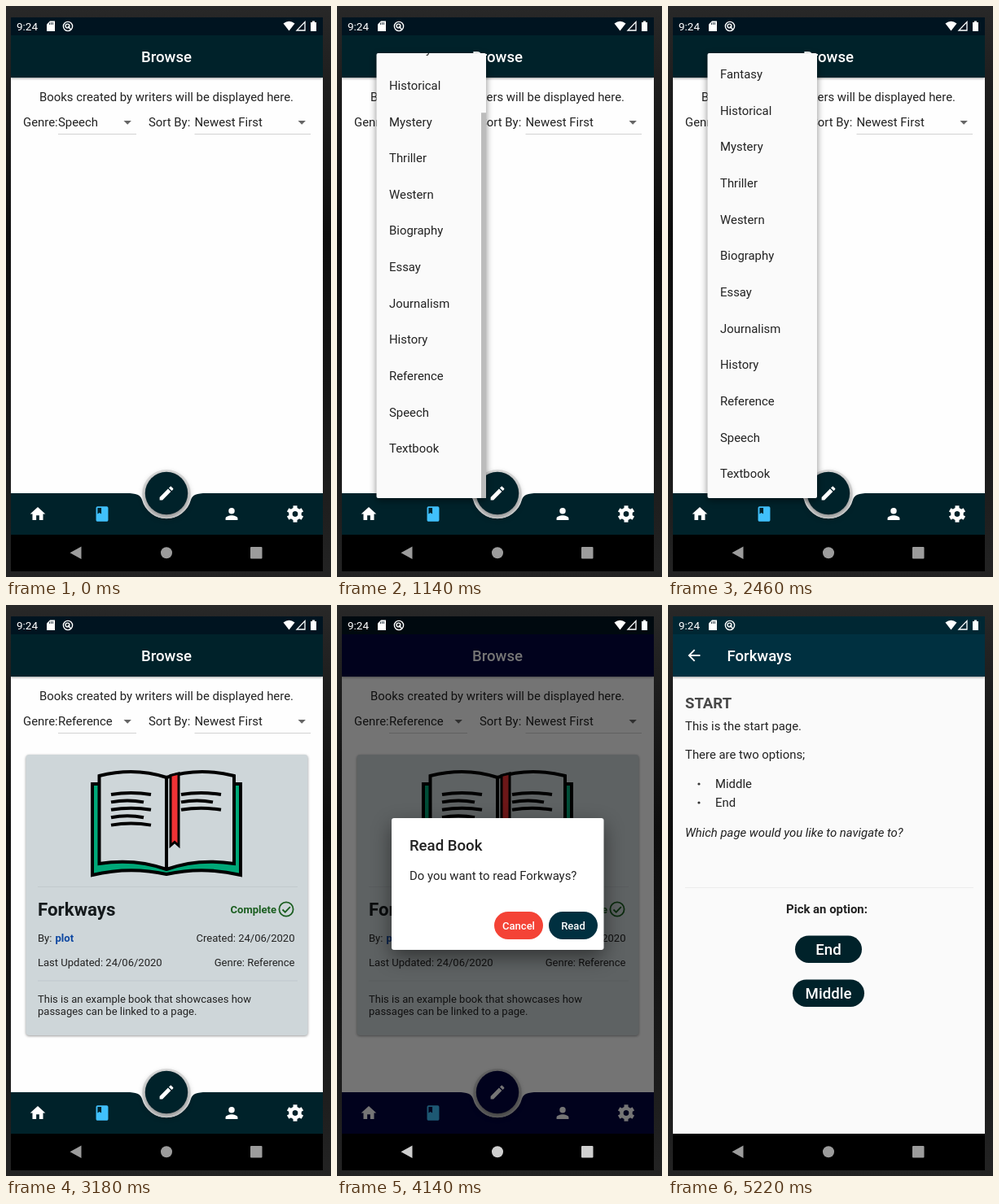
Write an HTML page that moves like this. It is 399 px wide and 702 px high and loops after 7920 ms.

```html
<!DOCTYPE html>
<html lang="en">
<head>
<meta charset="utf-8">
<title>Book browser</title>
<style>
  html, body { margin: 0; width: 100%; height: 100%; overflow: hidden; background: #151515; }
  svg { display: block; width: 399px; height: 702px; font-family: Roboto, sans-serif; --bar: #00222a; }
  text { white-space: pre; }
  .bar { fill: var(--bar); }
  .low { filter: drop-shadow(0 1px 1.5px #0006); }
  .mid { filter: drop-shadow(0 3px 4px #0007); }
  .high { filter: drop-shadow(0 9px 12px #0007); }
</style>
</head>
<body>
<svg id="stage" viewBox="0 0 399 702"></svg>
<script>
const LOOP = 7920, STEP = 60;
const MENU = { x: 48.5, y: 58, w: 134.5, h: 547, row: 44.65, content: 596 };
const GENRES = ['Fantasy', 'Historical', 'Mystery', 'Thriller', 'Western', 'Biography',
  'Essay', 'Journalism', 'History', 'Reference', 'Speech', 'Textbook'];
const TITLE = 'Forkways';
const BODY = 14.9, SMALL = 13.03, HEAD = 18.6;
const INK = '#222';

const text = (x, y, s, size = BODY, fill = INK, more = '') =>
  `<text x="${x}" y="${y}" font-size="${size}" fill="${fill}" ${more}>${s}</text>`;
const rect = (x, y, w, h, fill, more = '') =>
  `<rect x="${x}" y="${y}" width="${w}" height="${h}" fill="${fill}" ${more}/>`;
const path = (d, fill, more = '') => `<path d="${d}" fill="${fill}" ${more}/>`;
const icon = (cx, cy, d, fill = '#fff', scale = .931) =>
  path(d, fill, `fill-rule="evenodd" transform="translate(${cx} ${cy}) scale(${scale}) translate(-12 -12)"`);
const pill = (cx, y, w, h, label, size, fill, base) =>
  rect(cx - w / 2, y, w, h, fill, `rx="${h / 2}"`) +
  text(cx, base, label, size, '#fff', `${MIDDLE} ${MEDIUM}`);
const MIDDLE = 'text-anchor="middle"', END = 'text-anchor="end"';
const MEDIUM = 'font-weight="500"', BOLD = 'font-weight="700"';

const ICONS = {
  home: 'M10 20v-6h4v6h5v-8h3L12 3 2 12h3v8z',
  book: 'M18 2H6c-1.1 0-2 .9-2 2v16c0 1.1.9 2 2 2h12c1.1 0 2-.9 2-2V4c0-1.1-.9-2-2-2zM6 4h5v8l-2.5-1.5L6 12z',
  person: 'M12 12a4 4 0 1 0 0-8 4 4 0 0 0 0 8zm0 2c-2.67 0-8 1.34-8 4v2h16v-2c0-2.66-5.33-4-8-4z',
  edit: 'M3 17.25V21h3.75L17.81 9.94l-3.75-3.75zM20.71 7.04c.39-.39.39-1.02 0-1.41l-2.34-2.34c-.39-.39-1.02-.39-1.41 0l-1.83 1.83 3.75 3.75z',
  back: 'M20 11H7.83l5.59-5.59L12 4l-8 8 8 8 1.41-1.41L7.83 13H20z'
};

function gear(cx, cy) {
  const teeth = [0, 60, 120].map(a => `<path d="M0-10.2V10.2" transform="rotate(${a})"/>`).join('');
  return `<g transform="translate(${cx} ${cy})" fill="none" stroke="#fff">
    <g stroke-width="5">${teeth}</g>
    <circle r="3.2" fill="var(--bar)" stroke="none"/><circle r="5.6" stroke-width="4.4"/>
    <circle r="3.3" class="bar" stroke="none"/></g>`;
}

function dropdown(x, w, id, label) {
  return `<text id="${id}" x="${x}" y="148" font-size="${BODY}" fill="${INK}">${label}</text>` +
    rect(x, 157, w, 1, '#d2d2d2') + path(`M${x + w - 15.5} 141h9.4l-4.7 4.8z`, '#666');
}

function bookArt() {
  const line = (x, y, w) => `M${x} ${y}q${w / 2}-4 ${w} 0`;
  const rows = [0, 1, 2, 3, 4].map(i => line(129, 233 + i * 9.4, i % 2 ? 40 : 49)).join('') +
    [0, 1, 2].map(i => line(215, 233 + i * 9.4, i % 2 ? 39 : 49)).join('');
  return `<g stroke="#000" stroke-width="4">
    ${path('M106 220V332Q152 321 197 331Q242 321 288 332V220Z', '#00a878')}
    ${path('M114.500 210Q158 199 197 212Q236 199 280 210V318Q236 311 197 325Q158 311 114.500 318Z', '#ced6d9')}
    ${path('M197 212V325', 'none')}
    ${path('M202 209.500L212 207V296L207 291.500L202 296Z', '#ef3235', 'stroke-width="3"')}
    ${path(rows, 'none')}</g>`;
}

function card() {
  const rule = y => rect(39, y, 319, 1, '#c2cacd');
  return `<g id="card">${rect(24.5, 184, 346, 345, '#ced6d9', 'rx="4" class="low"')}
    ${bookArt()}${rule(346)}${rule(461.5)}
    ${text(39, 382, TITLE, 22.3, '#151a1c', BOLD)}
    ${text(332, 378.5, 'Complete', SMALL, '#1b5e20', BOLD + END)}
    <g fill="none" stroke="#1b5e20" stroke-width="1.8"><circle cx="344" cy="374" r="8.6"/><path d="M339.500 374.500l3.200 3.200 6.200-6.600"/></g>
    ${text(39, 414, 'By: ', SMALL)}${text(60.5, 414, 'plot', SMALL, '#0d47a1', BOLD)}
    ${text(354.5, 414, 'Created: 24/06/2020', SMALL, INK, END)}
    ${text(39, 444, 'Last Updated: 24/06/2020', SMALL)}
    ${text(354.5, 444, 'Genre: Reference', SMALL, INK, END)}
    ${text(39, 488.5, 'This is an example book that showcases how', SMALL)}
    ${text(39, 503.5, 'passages can be linked to a page.', SMALL)}</g>`;
}

function browse() {
  return rect(6, 14, 383, 636, '#fefefe') +
    rect(6, 36, 383, 52, 'var(--bar)', 'class="low"') + rect(6, 14, 383, 22, '#001420') +
    text(197, 69, 'Browse', HEAD, '#fff', MIDDLE + MEDIUM) +
    text(197, 117, 'Books created by writers will be displayed here.', BODY, INK, MIDDLE) +
    text(21, 148, 'Genre:') + dropdown(64, 96, 'genre', 'Speech') +
    text(175, 148, 'Sort By:') + dropdown(231.5, 142.5, 'sort', 'Newest First') + card() +
    path('M6 599H148C160 599 165 601 167 607A31 31 0 0 0 227 607C229 601 234 599 246 599H389V650H6Z', 'var(--bar)') +
    '<circle cx="197" cy="600" r="30" fill="#e4e4e4"/><circle cx="197" cy="599" r="26.200" class="bar mid"/>' +
    icon(197, 599, ICONS.edit) + icon(39, 624.5, ICONS.home) + icon(118, 624.5, ICONS.book, '#40c0fb') +
    icon(277, 624.5, ICONS.person) + gear(355, 624.5);
}

function menu() {
  const rows = GENRES.map((g, i) => `<text class="row" x="64" y="${89 + i * MENU.row}">${g}</text>`).join('');
  return `<g id="menu">
    <rect id="sheet" x="${MENU.x}" width="${MENU.w}" rx="2" fill="#fafafa" class="mid"/>
    <g clip-path="url(#menuClip)"><g id="rows" font-size="${BODY}" fill="${INK}">${rows}</g></g>
    <rect id="thumb" x="177" width="6" fill="#bcbcbc"/></g>`;
}

function dialog() {
  return `<rect id="dim" x="6" y="14" width="383" height="636"/>
    <g id="dialog">${rect(67, 262, 260.5, 162, '#fff', 'rx="3" class="high"')}
    ${text(89, 302, 'Read Book', HEAD, INK, MEDIUM)}
    ${text(89, 338, `Do you want to read ${TITLE}?`)}
    ${pill(223, 377, 60, 34, 'Cancel', SMALL, '#f44336', 399)}
    ${pill(290, 377, 60, 34, 'Read', SMALL, '#003040', 399)}
    <circle id="splash" cx="290" cy="394" fill="#fff" clip-path="url(#readClip)"/></g>`;
}

function reader() {
  const bullet = (y, s) => `<circle cx="38" cy="${y - 5}" r="1.600" fill="#333"/>` + text(58, y, s);
  return `<g id="page">${rect(6, 14, 383, 636, '#fafafa')}
    ${rect(6, 14, 383, 74, '#003040', 'class="low"')}${rect(6, 14, 383, 22, '#002733')}
    ${icon(32, 62, ICONS.back)}${text(72.5, 69, TITLE, HEAD, '#fff', MEDIUM)}
    ${text(21, 127, 'START', HEAD, '#484848', BOLD)}
    ${text(21, 154, 'This is the start page.')}${text(21, 189, 'There are two options;')}
    ${bullet(225, 'Middle')}${bullet(248, 'End')}
    ${text(21, 284.5, 'Which page would you like to navigate to?', BODY, INK, 'font-style="italic"')}
    ${rect(21, 347, 354, 1, '#ececec')}
    ${text(195, 378.5, 'Pick an option:', BODY, INK, MIDDLE + BOLD)}
    ${pill(197, 406.5, 82, 33.5, 'End', HEAD, '#00222a', 430)}
    ${pill(197, 460.5, 88, 33.5, 'Middle', HEAD, '#00222a', 484)}</g>`;
}

function system() {
  return text(13, 30, '9:24', 13.5, '#fff') +
    path('M54 18.500h6v12.500h-10v-8.500z', '#fff') +
    path('M53.500 20.500v2.500M55.500 20v3M57.500 20v3', 'none', 'stroke="#001420" stroke-width=".8"') +
    '<g fill="none" stroke="#fff" stroke-width="1.400"><circle cx="76" cy="25" r="5.600"/><circle cx="75.500" cy="24.500" r="2.400"/><path d="M76 25l3.800 4"/></g>' +
    path('M340.500 21.500Q347.500 16 354.500 21.500L347.500 30.500Z', '#fff') +
    path('M367 19.500V30H357Z', 'none', 'stroke="#fff" stroke-width="1.300"') +
    path('M374 20h2v-1.500h3V20h2v11h-7z', '#fff') +
    rect(6, 650, 383, 45, '#000') +
    `<g id="keys">${path('M92.500 664.500v15.500L78.500 672.200z', 'inherit')}
      <circle cx="197" cy="672.300" r="7"/><rect x="300" y="665" width="14.500" height="14.500" rx="1"/></g>`;
}

const stage = document.getElementById('stage');
stage.innerHTML = `<defs>
    <linearGradient id="desk" x2="0" y2="1">
      <stop stop-color="#282828"/><stop offset=".15" stop-color="#1d1d1d"/><stop offset=".4" stop-color="#0d0d0d"/>
      <stop offset=".65" stop-color="#151515"/><stop offset="1" stop-color="#232323"/></linearGradient>
    <clipPath id="app">${rect(6, 14, 383, 636, '#000')}</clipPath>
    <clipPath id="menuClip">${rect(MENU.x, MENU.y, MENU.w, MENU.h, '#000')}</clipPath>
    <clipPath id="readClip">${rect(260, 377, 60, 34, '#000', 'rx="17"')}</clipPath>
  </defs>
  ${rect(0, 0, 399, 702, 'url(#desk)')}
  <g clip-path="url(#app)">${browse()}${menu()}${dialog()}${reader()}</g>${system()}`;

const el = id => document.getElementById(id);
const rowEls = [...document.querySelectorAll('.row')];
const set = (node, attrs) => { for (const k in attrs) node.setAttribute(k, attrs[k]); };
const show = (node, opacity) => set(node, { opacity, display: opacity > 0 ? 'inline' : 'none' });
const clamp = v => Math.min(1, Math.max(0, v));
const span = (t, from, length) => clamp((t - from) / length);

// CSS-style cubic Bézier easing, solved by bisection
const bezier = (x1, y1, x2, y2) => p => {
  const at = (u, a, b) => 3 * u * (1 - u) ** 2 * a + 3 * u * u * (1 - u) * b + u ** 3;
  if (p <= 0 || p >= 1) return clamp(p);
  let lo = 0, hi = 1;
  for (let i = 0; i < 24; i++) {
    const m = (lo + hi) / 2;
    if (at(m, x1, x2) < p) lo = m; else hi = m;
  }
  return at(lo, y1, y2);
};
const ease = bezier(.25, .1, .25, 1), easeIn = bezier(.42, 0, 1, 1);
const easeOut = bezier(0, 0, .58, 1), fastOutSlowIn = bezier(.4, 0, .2, 1);

// Overdamped spring pulling the overscrolled list back
const overscroll = s => 388 * (22.03 * Math.exp(-9.08 * s) - 9.08 * Math.exp(-22.03 * s)) / 12.95;

function drawMenu(t) {
  const open = 803, close = 3030;
  const p = span(t, open, 300);
  show(el('menu'), t < open ? 0 : Math.min(span(p, 0, .25), 1 - span(t, close, 75)));
  const top = (MENU.h - MENU.row) * (1 - span(p, .25, .25));
  set(el('sheet'), { y: MENU.y + top, height: MENU.h - top });

  const over = t < open || t >= 1620 ? 0 : overscroll((t - open) / 1000);
  set(el('rows'), { transform: `translate(0 ${-over})` });
  const unit = .5 / 14.5;
  rowEls.forEach((row, i) => {
    const selected = GENRES[i] === 'Speech';
    set(row, { opacity: selected ? 1 : span(p, Math.min(1 - unit, .5 + (i + 2) * unit), 1.5 * unit) || (p >= 1 ? 1 : 0) });
  });

  const length = (MENU.h - over) / MENU.content * MENU.h;
  set(el('thumb'), { y: MENU.y + MENU.h - length, height: length });
  show(el('thumb'), Math.min(p, 1 - span(t, 2340, 120)));
}

function drawDialog(t) {
  const v = t < 4800 ? span(t, 3940, 150) : 1 - span(t, 4878, 150);
  const shade = ease(v);
  show(el('dim'), .54 * shade);
  show(el('dialog'), easeOut(v));
  const s = span(t, 4650, 230);
  set(el('splash'), { r: 36 * s, opacity: .16 * (s > 0 ? 1 : 0) });
  stage.style.setProperty('--bar', `color-mix(in srgb, #00222a, #020440 ${shade * 100}%)`);
  set(el('keys'), { fill: shade > 0 ? '#cfcfcf' : '#9c9c9c' });
}

function drawPage(t) {
  const p = span(t, 4878, 300);
  show(el('page'), easeIn(p));
  set(el('page'), { transform: `translate(0 ${159 * (1 - fastOutSlowIn(p))})` });
}

function draw(t) {
  el('genre').textContent = t < 3060 ? 'Speech' : 'Reference';
  show(el('card'), t < 3120 ? 0 : 1);
  drawMenu(t);
  drawDialog(t);
  drawPage(t);
}

let start;
function tick(now) {
  start ??= now;
  draw(Math.floor((now - start) % LOOP / STEP) * STEP);
  requestAnimationFrame(tick);
}
draw(0);
requestAnimationFrame(tick);
</script>
</body>
</html>
```
